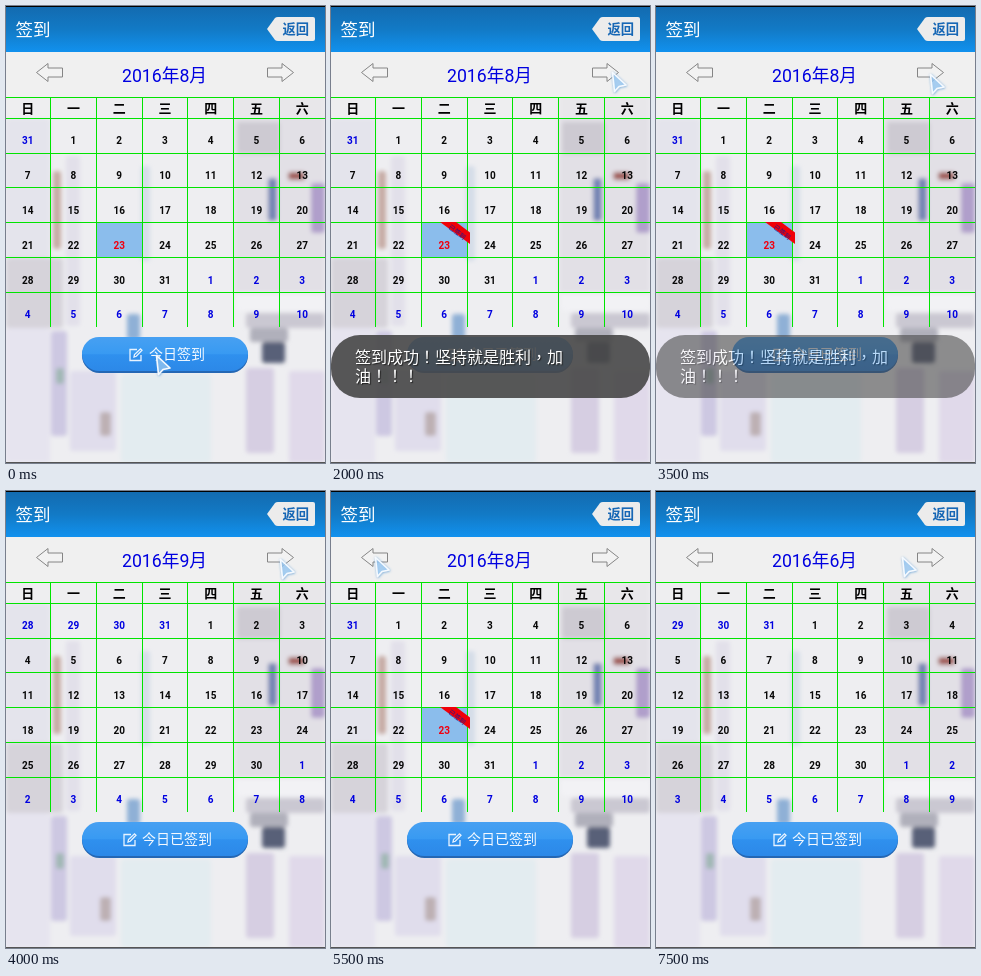
These frames come from a looping animation (319 px wide and 457 px high, 8000 ms). An HTML page:

```html
<!DOCTYPE html>
<html lang="zh-CN">
<head>
<meta charset="utf-8">
<style>
  html, body { margin: 0; width: 100%; height: 100%; overflow: hidden; background: #ececf0; }
  svg { display: block; font-family: Roboto, "Noto Sans CJK SC", "Noto Sans CJK", sans-serif; }
  .mid { text-anchor: middle; }
  .day { font-size: 10px; font-weight: 700; }
  .weekday { font-size: 13px; font-weight: 700; }
  .message { font: 16px "Noto Sans CJK TC", "Noto Sans CJK", sans-serif; fill: #fff; text-shadow: 1px 1px 1px #222; }
</style>
</head>
<body>
<svg width="319" height="457" viewBox="0 0 319 457">
  <defs>
    <linearGradient id="headerFill" x2="0" y2="1">
      <stop stop-color="#136bb0"/><stop offset=".5" stop-color="#127ac6"/><stop offset="1" stop-color="#1191ee"/>
    </linearGradient>
    <linearGradient id="buttonFill" x2="0" y2="1">
      <stop stop-color="#47a0f2"/><stop offset=".5" stop-color="#389af2"/>
      <stop offset=".52" stop-color="#2f90ee"/><stop offset="1" stop-color="#2c88e8"/>
    </linearGradient>
    <filter id="soft" x="-10%" y="-10%" width="120%" height="120%"><feGaussianBlur stdDeviation="2.2"/></filter>
    <filter id="glow" x="-40%" y="-40%" width="180%" height="180%">
      <feDropShadow dx=".4" dy=".6" stdDeviation="1" flood-color="#3c8cd0" flood-opacity=".8"/>
    </filter>
    <path id="arrow" d="M.5 9.5 12 .5V5H26.5V14H12V18.5Z" fill="#f2f2f2" stroke="#858585"/>
  </defs>

  <rect width="319" height="457" fill="#eeeef1"/>
  <g id="room" filter="url(#soft)"></g>
  <rect y="46" width="319" height="45" fill="#f0f0f0"/>
  <rect y="91" width="319" height="22" fill="#f0f0f0" opacity=".5"/>

  <rect y="1" width="319" height="45" fill="url(#headerFill)"/>
  <rect width="319" height="1"/>
  <rect y="456" width="319" height="1" fill="#555"/>
  <text x="9.5" y="29.5" font-size="17.5" fill="#fff">签到</text>
  <path d="M261 23 269 12Q270 11 272 11H307Q309 11 309 13V33Q309 35 307 35H272Q270 35 269 34Z" fill="#ececec"/>
  <text x="276.5" y="27.7" font-size="13.3" font-weight="700" fill="#1767b5">返回</text>

  <use href="#arrow" x="30" y="57"/>
  <use href="#arrow" transform="translate(288 57) scale(-1 1)"/>
  <text id="title" class="mid" x="158.5" y="76" font-size="17.7" fill="#0000e0"></text>

  <rect id="today" x="91" y="217" width="45" height="34" fill="#8bbdec"/>
  <g id="grid"></g>
  <g id="days"></g>
  <g id="badge">
    <path d="M109 216H125L139 226.5V238Z" fill="#f00008"/>
    <text class="mid" transform="translate(126 226.5) rotate(38)" y="2" font-size="6.5" fill="#1a1a90">已签到</text>
  </g>

  <rect x="76" y="332" width="166" height="35" rx="17.5" fill="#2467b4"/>
  <rect x="76" y="331" width="166" height="34" rx="17" fill="url(#buttonFill)"/>
  <g id="icon" fill="none" stroke="#e8f3ff" stroke-width="1.3">
    <path d="M8 1.5H1V12.5H12V7"/><path d="M5 9 5.5 6.5 11.5 .8 13 2.3 7.3 8.3Z"/>
  </g>
  <text id="label" class="mid" x="171" y="353" font-size="14" fill="#f4f9ff"></text>

  <g id="toast" lang="zh-TW">
    <rect y="329" width="319" height="63" rx="29" fill="#484848" opacity=".9"/>
    <text class="message" x="24" y="357">签到成功！坚持就是胜利，加</text>
    <text class="message" x="24" y="376">油！！！</text>
  </g>
  <path id="cursor" d="M1.5 1.5 3.5 20.5 8 15.5 15 14Z" fill="#a4d2f8" fill-opacity=".6" stroke="#f4faff"
        stroke-width="1.6" stroke-linejoin="round" filter="url(#glow)"/>
</svg>
<script>
const $ = id => document.getElementById(id);
const add = (parent, tag, attrs, text = '') => {
  const node = document.createElementNS('http://www.w3.org/2000/svg', tag);
  for (const key in attrs) node.setAttribute(key, attrs[key]);
  node.textContent = text;
  parent.append(node);
  return node;
};

// Blurred room behind the calendar: x, y, width, height, colour
[
  [0, 112, 44, 140, '#e4e4ec'], [0, 252, 57, 70, '#d6d3da'], [47, 165, 8, 78, '#c6aba4'],
  [60, 150, 14, 170, '#e2e0ea'], [135, 160, 9, 95, '#d5dde8'], [0, 322, 44, 135, '#e6e4ef'],
  [45, 325, 16, 105, '#cdc8e2'], [50, 362, 8, 16, '#a0b8b4'], [64, 365, 46, 80, '#e0ddec'],
  [94, 406, 11, 24, '#bdb0b4'], [121, 308, 13, 26, '#8fb0d6'], [115, 368, 90, 89, '#e3ecf0'],
  [228, 90, 91, 197, '#e2e0e6'], [231, 116, 43, 32, '#cdcad2'], [262, 172, 9, 43, '#7484b4'],
  [282, 166, 17, 8, '#a05a54'], [305, 177, 14, 50, '#b09fcb'], [230, 287, 89, 18, '#f2f2f5'],
  [240, 307, 79, 15, '#cac8d2'], [244, 322, 38, 14, '#b0b0bb'], [256, 336, 23, 21, '#596078'],
  [240, 362, 28, 85, '#d6cee2'], [283, 365, 36, 92, '#e0d9ea']
].forEach(([x, y, width, height, fill]) => add($('room'), 'rect', { x, y, width, height, fill, rx: 3 }));

const columnX = i => 21.7 + 45.75 * i;
const line = (x, y, width, height) => add($('grid'), 'rect', { x, y, width, height, fill: '#00e400' });
[44, 90, 136, 181, 227, 273].forEach(x => line(x, 91, 1, 230));
[91, 112, 147, 181, 216, 251, 286].forEach(y => line(0, y, 319, 1));
[...'日一二三四五六'].forEach((name, i) =>
  add($('grid'), 'text', { class: 'mid weekday', x: columnX(i), y: 107 }, name));

const cells = Array.from({ length: 42 }, (_, i) => add($('days'), 'text', {
  class: 'mid day', x: columnX(i % 7), y: 138.2 + 34.85 * Math.floor(i / 7)
}));

const show = (id, visible) => $(id).setAttribute('visibility', visible ? 'visible' : 'hidden');

function drawMonth(month, signed) {
  const offset = new Date(2016, month - 1, 1).getDay();
  $('title').textContent = `2016年${month}月`;
  cells.forEach((cell, i) => {
    const date = new Date(2016, month - 1, i - offset + 1);
    const inMonth = date.getMonth() === month - 1;
    const isToday = month === 8 && inMonth && date.getDate() === 23;
    cell.textContent = date.getDate();
    cell.setAttribute('fill', isToday ? '#f00010' : inMonth ? '#080808' : '#0000e0');
  });
  show('today', month === 8);
  show('badge', month === 8 && signed);
}

const STEP = 500;
const cursorPath = [
  [149, 348], [236, 305], [236, 305], [162, 345], [280, 65], [276, 67], [273, 67], [273, 67],
  [273, 67], [121, 84], [47, 66], [43, 65], [61, 67], [32, 72], [40, 67], [245, 65]
];
const monthAt = step => step < 8 ? 8 : step < 11 ? 9 : step < 14 ? 8 : step < 15 ? 7 : 6;

let shown = -1;
function frame(now) {
  const step = Math.floor(now % 8000 / STEP);
  if (step !== shown) {
    shown = step;
    const signed = step >= 3;
    drawMonth(monthAt(step), signed);
    $('label').textContent = signed ? '今日已签到' : '今日签到';
    $('icon').setAttribute('transform', `translate(${signed ? 117 : 123} 342)`);
    show('toast', step >= 4 && step < 8);
    $('toast').setAttribute('opacity', step === 7 ? .65 : 1);
    $('cursor').setAttribute('transform', `translate(${cursorPath[step]})`);
  }
  requestAnimationFrame(frame);
}
frame(0);
</script>
</body>
</html>
```
